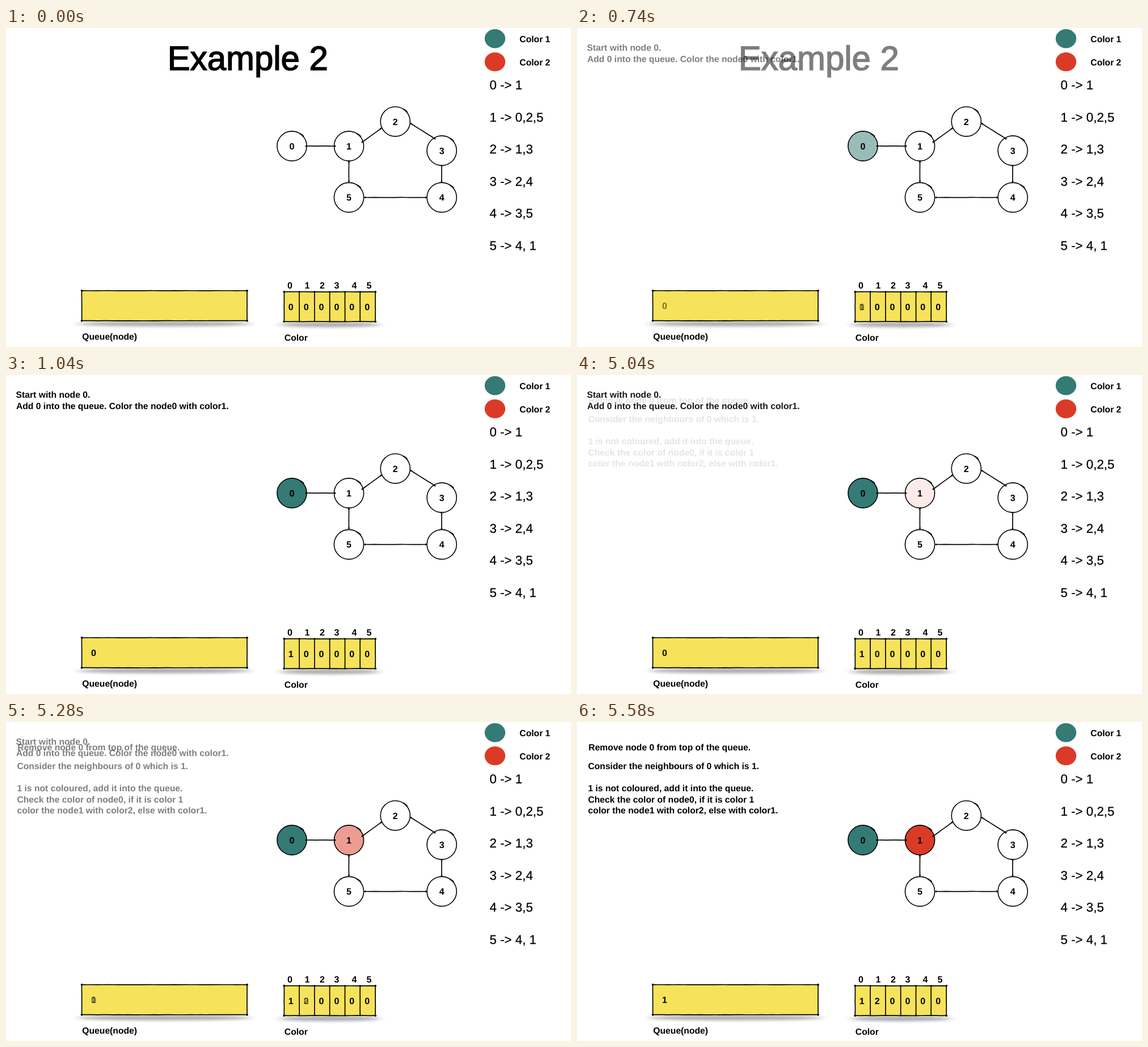
Write an HTML page that moves like this. It is 996 px wide and 562 px high and loops after 8000 ms.

```html
<!DOCTYPE html>
<html lang="en">
<head>
<meta charset="utf-8">
<title>Graph colouring</title>
<style>
  html, body { margin: 0; width: 100%; height: 100%; overflow: hidden; background: #fff; }
  svg { display: block; width: 100%; height: 100%; }
  text { font: bold 15.7px "Liberation Sans", Arial, sans-serif; fill: #000; text-rendering: geometricPrecision; }
  .title { font-size: 59.9px; font-weight: normal; stroke: #000; stroke-width: 1.5px; }
  .list { font-size: 22.3px; font-weight: normal; stroke: #000; stroke-width: .25px; }
  .digit { font-size: 16px; text-anchor: middle; }
  .ink { fill: none; stroke: #000; stroke-linecap: round; stroke-linejoin: round; }
</style>
</head>
<body>
<svg id="stage" viewBox="0 0 996 562">
  <defs>
    <filter id="soft" x="-15%" y="-150%" width="130%" height="400%"><feGaussianBlur stdDeviation="8 2.4"/></filter>
  </defs>
</svg>
<script>
const TEAL = '#347a75', RED = '#db3b26', YELLOW = '#f6e35b';
const LOOP = 8000, STEP = 60, STEPS = 10;
const stage = document.getElementById('stage');

let seed = 7;
const rand = () => (seed = seed * 16807 % 2147483647) / 2147483647;
const jitter = a => (rand() * 2 - 1) * a;

function add(tag, attrs, parent = stage) {
  const el = document.createElementNS('http://www.w3.org/2000/svg', tag);
  for (const k in attrs) el.setAttribute(k, attrs[k]);
  parent.appendChild(el);
  return el;
}
function label(str, x, y, cls = '', parent = stage) {
  const el = add('text', { x, y, class: cls }, parent);
  el.textContent = str;
  return el;
}
const digit = (str, x, y, parent) => label(str, x, y, 'digit', parent);
const dot = (cx, cy, r) => add('circle', { cx, cy, r });

// Slightly uneven pen line
function penLine(x1, y1, x2, y2, r = 1.7) {
  const len = Math.hypot(x2 - x1, y2 - y1), n = Math.max(2, Math.round(len / 9));
  const nx = (y1 - y2) / len, ny = (x2 - x1) / len;
  let d = `M${x1} ${y1}`;
  for (let i = 1; i <= n; i++) {
    const k = i / n, o = i < n ? jitter(0.15) : 0;
    d += `L${(x1 + (x2 - x1) * k + nx * o).toFixed(2)} ${(y1 + (y2 - y1) * k + ny * o).toFixed(2)}`;
  }
  add('path', { d, class: 'ink', 'stroke-width': 1.7 });
  dot(x1, y1, r);
  dot(x2, y2, r);
}

// Hand-drawn ring with a thicker overlap at the upper right
function penRing(cx, cy, r) {
  const at = (deg, rad) => {
    const a = deg * Math.PI / 180;
    return `${(cx + rad * Math.cos(a)).toFixed(2)} ${(cy + rad * Math.sin(a)).toFixed(2)}`;
  };
  add('circle', { cx, cy, r, class: 'ink', 'stroke-width': 1.6 });
  add('path', { d: `M${at(-56, r)}L${at(-48, r + 0.4)}L${at(-40, r + 0.6)}`, class: 'ink', 'stroke-width': 2.2 });
}

function box(x1, y1, x2, y2) {
  add('ellipse', {
    cx: (x1 + x2) / 2, cy: y2 + 5.5, rx: (x2 - x1) / 2 + 8, ry: 4.5,
    fill: '#000', opacity: 0.32, filter: 'url(#soft)'
  });
  add('rect', { x: x1, y: y1, width: x2 - x1, height: y2 - y1, fill: YELLOW });
  penLine(x1, y1, x2, y1);
  penLine(x2, y1, x2, y2);
  penLine(x2, y2, x1, y2);
  penLine(x1, y2, x1, y1);
}

// Legend and adjacency list
[[TEAL, 18.7, 25], [RED, 59.6, 66]].forEach(([fill, cy, y], i) => {
  add('ellipse', { cx: 862, cy, rx: 18.2, ry: 16.7, fill });
  label(`Color ${i + 1}`, 905.3, y);
});
['1', '0,2,5', '1,3', '2,4', '3,5', '4, 1'].forEach((s, i) =>
  label(`${i} -> ${s}`, 852.6, 108.4 + 56.5 * i, 'list'));

// Graph
const nodes = [[504, 208], [604.5, 208], [686.3, 164.8], [768.2, 216], [768.2, 298.5], [604.5, 298.5]];
const fills = nodes.map(([cx, cy], i) =>
  add('circle', { cx, cy, r: 26, fill: i ? RED : TEAL, opacity: 0 }));
nodes.forEach(([x, y], i) => {
  penRing(x, y, 26.1);
  digit(i, x, y + 5.8);
});
[[529, 208, 580, 208], [628, 201, 661, 177], [714, 168.5, 756, 195],
 [768, 243, 768, 271], [633, 298.5, 740, 298.5], [604.5, 236, 604.5, 270]]
  .forEach(e => penLine(...e, 1.5));

// Queue and colour table
box(133.5, 462.8, 425, 515.7);
label('Queue(node)', 134.3, 548.6);
box(490.3, 464.8, 651.2, 517.2);
label('Color', 490.8, 550.5);
for (let i = 1; i < 6; i++) penLine(490.3 + 26.8 * i, 465, 490.3 + 26.8 * i, 517, 1.4);
[500.5, 531, 557.5, 583, 614, 640].forEach((x, i) => digit(i, x, 459.2));
const cellX = i => 502.2 + 26.9 * i, cellY = 497.4;
for (let i = 2; i < 6; i++) digit(0, cellX(i), cellY);

// Parts that dissolve
const group = () => add('g', {});
const before = group(), first = group(), second = group();
const untilFirst = group(), fromFirst = group(), untilSecond = group();

label('Example 2', 284.8, 74.2, 'title', before);
digit(0, cellX(0), cellY, untilFirst);
digit(1, cellX(0), cellY, fromFirst);
digit(0, cellX(1), cellY, untilSecond);

label('Start with node 0.', 17.6, 40, '', first);
label('Add 0 into the queue. Color the node0 with color1.', 17.9, 59.6, '', first);
digit(0, 154.5, 495.4, first);

[['Remove node 0 from top of the queue.', 20.3, 49.8],
 ['Consider the neighbours of 0 which is 1.', 19.4, 83.4],
 ['1 is not coloured, add it into the queue.', 19.4, 122.4],
 ['Check the color of node0, if it is color 1', 19.4, 141.6],
 ['color the node1 with color2, else with color1.', 19.6, 161]]
  .forEach(([s, x, y]) => label(s, x, y, '', second));
digit(1, 154.5, 495.4, second);
digit(2, cellX(1), cellY, second);

const fade = (el, v) => el.setAttribute('opacity', v);
const dissolve = (t, start) =>
  t < start ? 0 : Math.min(1, (Math.floor((t - start) / STEP) + 1) / STEPS);

function draw(t) {
  const p = dissolve(t, 500), q = dissolve(t, 5040);
  fade(before, 1 - p);
  fade(untilFirst, 1 - p);
  fade(fromFirst, p);
  fade(first, q > 0 ? 1 - q : p);
  fade(untilSecond, 1 - q);
  fade(second, q);
  fade(fills[0], p);
  fade(fills[1], q);
}

const origin = performance.now();
function tick() {
  draw((performance.now() - origin) % LOOP);
  requestAnimationFrame(tick);
}
draw(0);
requestAnimationFrame(tick);
</script>
</body>
</html>
```
